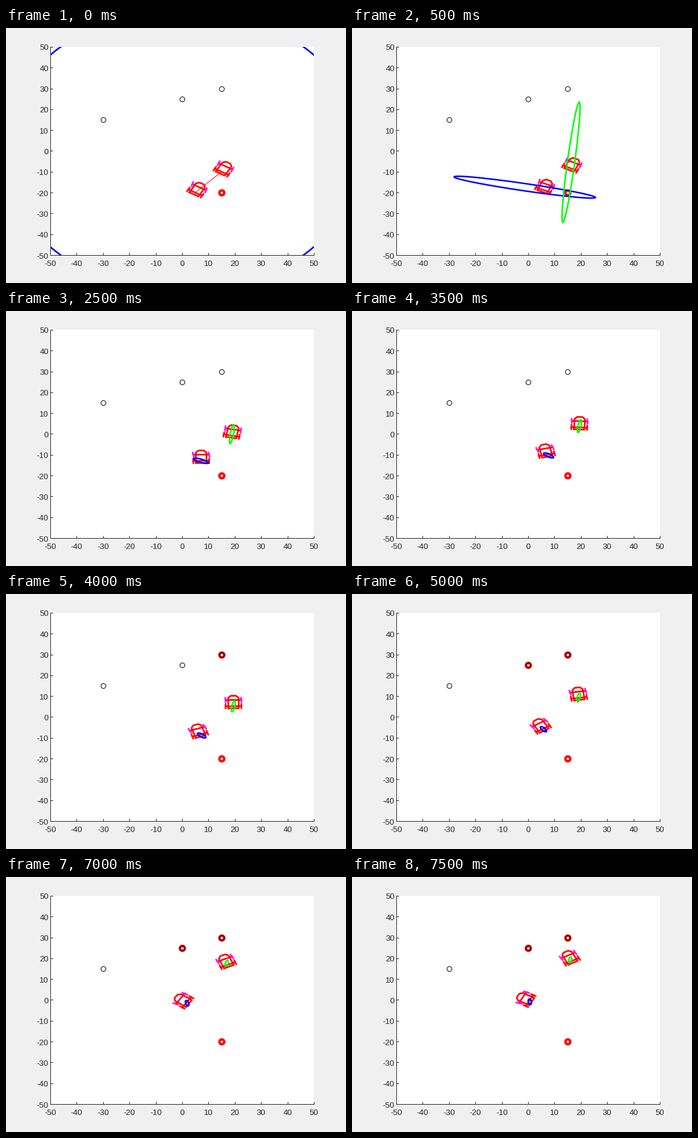
Recreate the animation shown at these times as a matplotlib script. Size 560 by 420 pixels, loop 8 s.

```python
import matplotlib.pyplot as plt
import numpy as np
from matplotlib.animation import FuncAnimation
from matplotlib.transforms import ScaledTranslation

W, H, DPI = 560, 420, 100
STEPS = 16
LEFT, RIGHT, TOP, BOTTOM = 73, 507, 31, 374
SX, SY = (RIGHT - LEFT) / 100, (BOTTOM - TOP) / 100


def px(n):
    return n * 72 / DPI


plt.rcParams.update({
    "font.family": "Liberation Sans",
    "font.size": px(13.33),
    "axes.unicode_minus": False,
})

fig = plt.figure(figsize=(W / DPI, H / DPI), dpi=DPI, facecolor="#f0f0f0")
ax = fig.add_axes([LEFT / W, 1 - BOTTOM / H, (RIGHT - LEFT) / W, (BOTTOM - TOP) / H])
ax.set(xlim=(-50, 50), ylim=(-50, 50),
       xticks=range(-50, 51, 10), yticks=range(-50, 51, 10))
ax.spines[["top", "right"]].set_visible(False)
for side in ("left", "bottom"):
    ax.spines[side].set(color="#262626", linewidth=px(1))
ax.tick_params(direction="in", length=px(4.3), width=px(1), color="#262626",
               labelcolor="#262626")
ax.tick_params(axis="x", pad=px(9.5))
ax.tick_params(axis="y", pad=px(3))
nudge = ScaledTranslation(0, -1 / DPI, fig.dpi_scale_trans)
for label in ax.get_yticklabels():
    label.set_transform(label.get_transform() + nudge)


def ring(x, y, color, size, width, z):
    return ax.plot(x, y, "o", mfc="none", mec=color, ms=px(size), mew=px(width),
                   zorder=z)[0]


# Landmarks (x, y, step when first seen); seen ones get a thick red ring
LANDMARKS = [(15, -20, 0), (15, 30, 8), (0, 25, 10), (-30, 15, STEPS)]
rings = []
for x, y, seen in LANDMARKS:
    rings.append((seen, ring(x, y, "red", 8, 4, 3)))
    if seen:
        ring(x, y, "black", 8, 1, 4)


def rotate(points, angle):
    c, s = np.cos(angle), np.sin(angle)
    return points @ np.array([[c, s], [-s, c]])


def join(*parts):
    gap = np.full((1, 2), np.nan)
    return np.vstack([row for p in parts for row in (p, gap)])


def wheel(x, y, steer=0.0):
    return rotate(np.array([(-1.0, 0), (1.0, 0)]), steer) + (x, y)


def axle(x):
    return np.array([(x, -3.0), (x, 3.0)])


# Vehicle frame: x forward, y left, origin on the rear axle
SIDE = np.array([(-1.0, 2), (4, 2), (5, 1)])
BODY = np.vstack([SIDE, SIDE[::-1] * (1, -1), SIDE[:1]])
FRAME = join(BODY, axle(0), axle(3), wheel(0, -3), wheel(0, 3))


class Vehicle:
    """Drives an arc while its position estimate settles."""

    def __init__(self, start, speed, turn, steer, color, cov):
        self.heading = np.radians(60 + turn * np.arange(STEPS))
        moves = speed * np.column_stack([np.cos(self.heading), np.sin(self.heading)])
        self.pos = start + np.vstack([(0, 0), np.cumsum(moves[:-1], axis=0)])
        self.front = join(wheel(3, -3, steer), wheel(3, 3, steer))
        self.cov = cov
        self.frame_line = self.line("red", 2.67, 5)
        self.front_line = self.line("magenta", 2.67, 6)
        self.cov_line = self.line(color, 2.5, 7)

    @staticmethod
    def line(color, width, z):
        return ax.plot([], [], color=color, lw=px(width), zorder=z)[0]

    def ellipse(self, n):
        """Shrinking ellipse whose centre sways along its long axis."""
        length, tilt, sway, lead = self.cov(n)
        width = 2.4 + 3.6 / n ** 1.5
        t = np.linspace(0, 2 * np.pi, 80)
        shape = np.column_stack([sway + length * np.cos(t), width * np.sin(t)])
        ahead = rotate(np.array([lead, 0.0]), self.heading[n])
        return rotate(shape, np.radians(tilt)) / (SX, -SY) + self.pos[n] + ahead

    def draw(self, n):
        for line, shape in ((self.frame_line, FRAME), (self.front_line, self.front)):
            line.set_data(*(rotate(shape, self.heading[n]) + self.pos[n]).T)
        self.cov_line.set_visible(n > 0)
        if n:
            self.cov_line.set_data(*self.ellipse(n).T)


# Half length (px), tilt (degrees), sway (px) and lead (units) at step n
def slow_cov(n):
    return (115 / n ** 1.5 + 2.5, 8 + 0.3 * n ** 2,
            2 - 33 * np.sin(1.45 * n) / n ** 1.5, 0)


def fast_cov(n):
    return (100 / n ** 1.15, 97 + 0.8 * n,
            -20 * np.cos(np.pi * n / 3) / n, 0.005 * n ** 2)


vehicles = [Vehicle((5, -20), 1.5, 6.1, 0.2, "blue", slow_cov),
            Vehicle((15, -10), 2.0, 3.83, 0.1, "lime", fast_cov)]

arc = np.linspace(0, 2 * np.pi, 400)
prior, = ax.plot(68 * np.cos(arc), 68 * np.sin(arc), color="blue", lw=px(2.67))
link, = ax.plot([5, 15], [-20, -10], color="red", lw=px(1), zorder=4)


def update(n):
    for vehicle in vehicles:
        vehicle.draw(n)
    prior.set_visible(n == 0)
    link.set_visible(n == 0)
    for seen, red in rings:
        red.set_visible(n >= seen)
    return []


anim = FuncAnimation(fig, update, frames=STEPS, interval=500, repeat=True,
                     repeat_delay=0)
plt.show()
```
